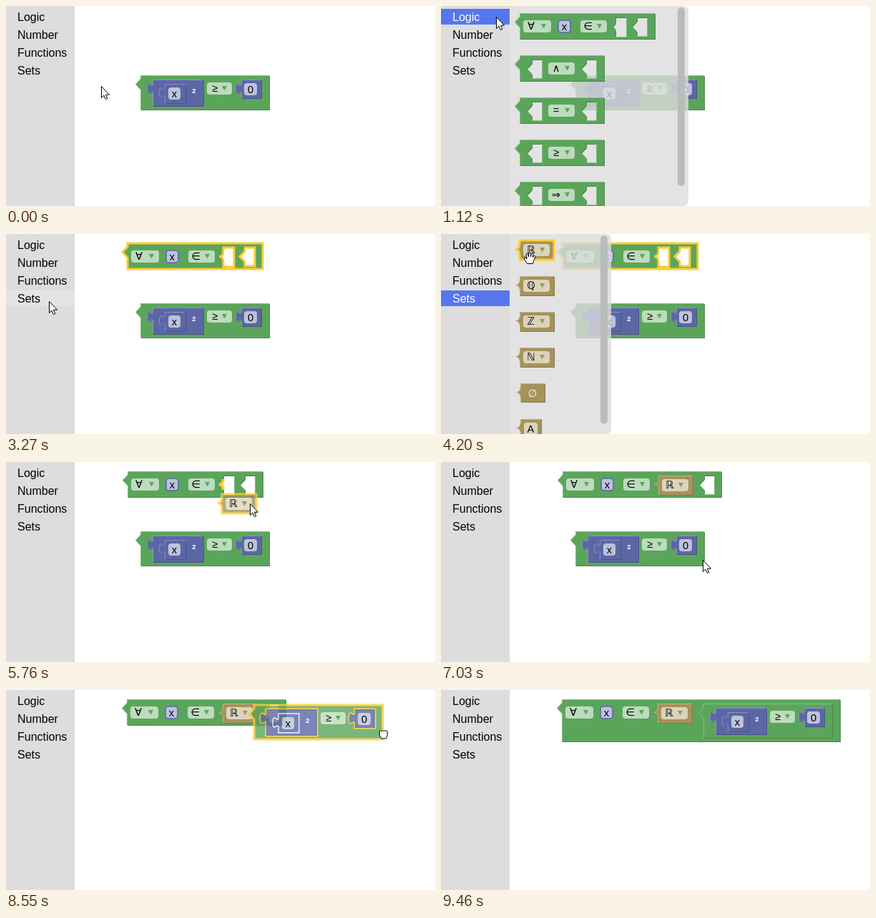
These frames come from a looping animation (600 px wide and 280 px high, 10000 ms). An HTML page:

```html
<!DOCTYPE html>
<html lang="en">
<head>
<meta charset="utf-8">
<title>Block editor</title>
<style>
html, body { margin: 0; width: 100%; height: 100%; overflow: hidden; background: #fff; }
svg { display: block; width: 600px; height: 280px; }
text { font: 14.67px "Liberation Sans", "DejaVu Sans", sans-serif; text-anchor: middle; }
.menu text { font-size: 16px; text-anchor: start; }
.sup { font-size: 9.5px; font-weight: bold; fill: #fff; }
.body, .dark { fill-rule: evenodd; }
.light { fill: none; stroke-width: 1; }
.field { fill: #fff; fill-opacity: .6; }
.var { fill: #bcc1df; stroke: #5b67a5; stroke-width: 1.6; }
.sel > .body { stroke: #fc3; stroke-width: 3; }
.sel > .light, .drag .light, .drag .dark { display: none; }
.drag .body { opacity: .8; }
.drag .inner > .body { stroke: #fff; stroke-width: 1.4; }
.hint { fill: none; stroke: #fc3; stroke-width: 4; }
.cursor path { fill: #fff; stroke: #000; stroke-linejoin: round; }
</style>
</head>
<body>
<svg id="stage" viewBox="0 0 600 280"></svg>
<script>
const GREEN = { fill: '#5ba55b', dark: '#498449', light: '#8cc08c' };
const BLUE = { fill: '#5b67a5', dark: '#495284', light: '#8c95c0' };
const TAN = { fill: '#a5935b', dark: '#847649', light: '#c0b38c' };

// Connector outlines, drawn upwards from y = 20 to y = 5.
const TAB = {
  bool: 'l-7-7.5l7-7.5',
  num: 'c0-10-8 8-8-7.5s8 2.5 8-7.5',
  set: 'c0-5-3-7.5-6-7.5c3 0 6-2.5 6-7.5'
};

const outline = (x, y, w, h, tab) =>
  `M${x} ${y}h${w}v${h}h${-w}V${y + 20}${TAB[tab]}Z`;

const at = (x, y) => `translate(${x} ${y})`;

function block({ x = 0, y = 0, w, h, tab, color, slots = [], inner = '', cls = '', id = '' }) {
  const d = outline(0, 0, w, h, tab) + slots.map(s => outline(...s)).join('');
  const edges = `M.5 ${h - 1}V20${TAB[tab]}V.5H${w - 1}` +
    slots.map(([sx, sy, sw, sh]) => `M${sx} ${sy + sh + .5}h${sw + .5}v${-sh}`).join('');
  return `<g class="${cls}" ${id && `id="${id}"`} transform="${at(x, y)}">
    <path class="dark" d="${d}" fill="${color.dark}" transform="translate(1 1)"/>
    <path class="body" d="${d}" fill="${color.fill}"/>
    <path class="light" d="${edges}" stroke="${color.light}"/>${inner}</g>`;
}

const label = (s, x, y, cls = '') => `<text class="${cls}" x="${x}" y="${y}">${s}</text>`;
const field = (s, x, y, w, cls = 'field') =>
  `<rect class="${cls}" x="${x}" y="${y}" width="${w}" height="17" rx="4"/>` +
  label(s, x + w / 2, y + 13.5);
const dropdown = (s, x, y, w, color) =>
  `<rect class="field" x="${x}" y="${y}" width="${w}" height="17" rx="4"/>` +
  label(s, x + 11, y + 13) +
  `<path d="M${x + w - 14} ${y + 5}h7l-3.5 6.5z" fill="${color.fill}"/>`;

const setBlock = (s, x, y, id) => block({
  x, y, w: 48, h: 27, tab: 'set', color: TAN, id, inner: dropdown(s, 5, 5, 37, TAN)
});

function compare(x, y, id) {
  const variable = block({
    x: 17, y: 6, w: 29, h: 27, tab: 'num', color: BLUE, cls: 'inner', inner: field('x', 5, 5, 17)
  });
  const square = block({
    x: 17, y: 6, w: 71, h: 37, tab: 'num', color: BLUE, slots: [[17, 6, 29, 27, 'num']],
    inner: variable + label('2', 58, 18.5, 'sup')
  });
  const zero = block({
    x: 141, y: 6, w: 28, h: 26, tab: 'num', color: BLUE, inner: field('0', 4, 5, 18)
  });
  return block({
    x, y, w: 180, h: 48, tab: 'bool', color: GREEN, id,
    slots: [[17, 6, 71, 37, 'num'], [141, 6, 28, 26, 'num']],
    inner: square + dropdown('≥', 93, 10, 35, GREEN) + zero
  });
}

// level: 0 = both slots empty, 1 = set filled, 2 = both filled
function forAll(level, id) {
  const setW = level ? 48 : 15, x2 = level ? 198 : 164;
  const [w, h] = [[189, 36], [222, 36], [389, 59]][level];
  const slots = [[134, 6, setW, 27, 'set'],
    level > 1 ? [x2, 6, 180, 48, 'bool'] : [x2, 6, 14, 26, 'bool']];
  return block({
    w, h, tab: 'bool', color: GREEN, slots, id,
    inner: dropdown('∀', 5, 10, 39, GREEN) + field('x', 54, 10, 17, 'var') +
      dropdown('∈', 85, 10, 37, GREEN) +
      (level ? setBlock('ℝ', 134, 6, '') : '') + (level > 1 ? compare(x2, 6, 'nested') : '')
  });
}

const hint = (x, y, tab, id) =>
  `<path class="hint" id="${id}" d="M${x} ${y + 20}${TAB[tab]}"/>`;

const flyout = (id, right, items, bar) =>
  `<g id="${id}"><path d="M96 0H${right - 8}q8 0 8 8V272q0 8-8 8H96z" fill="#ddd" fill-opacity=".8"/>
   ${items}<rect x="${right - 15}" y="2" width="10" height="${bar}" rx="5" fill="#bbb"/></g>`;

const binary = (op, y) => block({
  x: 110, y, w: 118, h: 36, tab: 'bool', color: GREEN,
  slots: [[17, 6, 14, 26, 'bool'], [93, 6, 14, 26, 'bool']], inner: dropdown(op, 40, 10, 37, GREEN)
});
const logicItems = `<g transform="translate(110 10)">${forAll(0, 'pickAll')}</g>` +
  binary('∧', 69) + binary('=', 128) + binary('≥', 187) + binary('⇒', 246);

const setItems = ['ℝ', 'ℚ', 'ℤ', 'ℕ'].map((s, i) =>
  setBlock(s, 110, 9 + 50 * i, i ? '' : 'pickSet')).join('') +
  block({ x: 111, y: 209, w: 34, h: 26, tab: 'set', color: TAN,
    inner: '<text x="17" y="18.5" fill="#fff">∅</text>' }) +
  block({ x: 111, y: 259, w: 29, h: 27, tab: 'set', color: TAN, inner: field('A', 5, 5, 19) });

const names = ['Logic', 'Number', 'Functions', 'Sets'];
const stage = document.getElementById('stage');
stage.innerHTML = `
  <g id="all">${forAll(0, 'all0')}${forAll(1, 'all1')}${forAll(2, 'all2')}
    ${hint(134, 6, 'set', 'hintSet')}${hint(198, 6, 'bool', 'hintBool')}</g>
  ${compare(188, 97, 'cmp')}
  ${setBlock('ℝ', 0, 0, 'real')}
  <g class="menu"><rect width="96" height="280" fill="#ddd"/>
    <rect id="row" width="96" height="22"/>
    ${names.map((s, i) => label(s, 16, 21 + 25 * i)).join('')}</g>
  ${flyout('logic', 346, logicItems, 250)}
  ${flyout('sets', 238, setItems, 264)}
  <g class="cursor" id="cursor">
    <path id="arrow" d="M.5.5V16.5L4 13.2 6.4 18.6 8.8 17.6 6.5 12.2H11.5Z"/>
    <path id="open" d="M-3.5 7.5-7.6 1a1.4 1.4 0 0 1 2.3-1.5L-3.8 1-5-5.3a1.3 1.3 0 0 1 2.5-.6L-1.6-2-1.4-7a1.3 1.3 0 0 1 2.6 0L1.4-2 2.4-6.2a1.3 1.3 0 0 1 2.5.5L4.3-1 5.6-3.2a1.3 1.3 0 0 1 2.3 1L5.5 3.8 4.5 7.5Z"/>
    <path id="fist" d="M-5.5 0V-3a1.4 1.4 0 0 1 2.7-1a1.4 1.4 0 0 1 2.7-.4a1.4 1.4 0 0 1 2.7.3a1.4 1.4 0 0 1 2.7 1V1.5L3.8 6H-3L-5.5 1.5Z"/>
  </g>`;

const el = {};
stage.querySelectorAll('[id]').forEach(n => el[n.id] = n);
const labels = stage.querySelectorAll('.menu text');

// Screen refresh moments of the recorded session.
const TICKS = [0, 130, 270, 420, 550, 700,
  980, 1120, 1260, 1400, 1540, 1680, 1820, 1970, 2120,
  2390, 2530, 2680, 2830, 2980, 3130, 3270, 3390,
  3810, 3950, 4080, 4200, 4360, 4510, 4660, 4800,
  4920, 5060, 5200, 5340, 5480, 5620, 5760, 5910, 6040,
  6340, 6480, 6620, 6750, 6890, 7030,
  7340, 7480, 7610, 7740, 7870, 8000, 8150, 8280,
  8420, 8570, 8720, 8870, 9010, 9160, 9310, 9460];

// Pointer path: time, x, y
const POINTER = [
  [30, 133, 112], [700, 50, 6], [900, 50, 6], [1540, 150, 38], [1820, 153, 41],
  [1970, 185, 42], [2120, 213, 44], [2250, 213, 44], [3200, 60, 94], [3700, 60, 94],
  [4200, 124, 34], [4360, 124, 34], [4660, 147, 23], [4850, 148, 23],
  [5760, 341, 58], [5910, 344, 45], [6040, 345, 42], [6240, 345, 42],
  [6620, 392, 85], [7030, 366, 137], [7250, 369, 138], [8000, 460, 108],
  [8280, 518, 68], [8420, 528, 62], [8600, 528, 62], [9160, 534, 127]
];

function follow(path, t) {
  const i = path.findIndex(p => p[0] > t);
  if (i === 0) return path[0].slice(1);
  if (i < 0) return path[path.length - 1].slice(1);
  const a = path[i - 1], b = path[i];
  const u = (t - a[0]) / (b[0] - a[0]);
  const k = b[0] - a[0] > 300 ? u * u * (3 - 2 * u) : u;
  return [a[1] + (b[1] - a[1]) * k, a[2] + (b[2] - a[2]) * k];
}

const show = (id, on) => el[id].style.display = on ? '' : 'none';
const mark = (id, cls, on) => el[id].classList.toggle(cls, on);
const move = (id, x, y) => el[id].setAttribute('transform', at(Math.round(x), Math.round(y)));

function draw(t) {
  const within = (a, b) => t >= a && t < b;
  const [x, y] = follow(POINTER, t);

  const logicOpen = within(980, 1820), setsOpen = within(3390, 4920);
  const dragAll = within(1820, 2390), dragSet = within(4920, 6340), dragCmp = within(7340, 8570);

  const hover = x < 96 ? Math.floor((y - 4) / 25) : -1;
  const active = logicOpen ? 0 : setsOpen ? 3 : -1;
  const row = active >= 0 ? active : hover;
  show('row', row >= 0 && row < 4);
  el.row.setAttribute('y', 4 + 25 * row);
  el.row.setAttribute('fill', active >= 0 ? '#57e' : '#e4e4e4');
  labels.forEach((n, i) => n.setAttribute('fill', i === active ? '#fff' : '#000'));

  show('logic', logicOpen);
  show('sets', setsOpen);
  mark('pickAll', 'sel', t >= 1540);
  mark('pickSet', 'sel', t >= 4080);

  const level = t < 6340 ? 0 : t < 8570 ? 1 : 2;
  show('all', t >= 1820);
  for (let i = 0; i < 3; i++) show('all' + i, i === level);
  mark('all0', 'sel', t < 4920);
  mark('all', 'drag', dragAll);
  if (dragAll) {
    const k = Math.min(1, (t - 1820) / 300);
    move('all', 110 + 60 * k, 10 + 3 * k);
  } else move('all', t < 7340 ? 170 : 169, 13);
  show('hintSet', within(5620, 6340));
  show('hintBool', within(7870, 8570));

  show('real', dragSet);
  mark('real', 'sel', dragSet);
  mark('real', 'drag', dragSet);
  move('real', x - 39, y - 13.5);

  show('cmp', t < 8570);
  mark('cmp', 'sel', dragCmp);
  mark('cmp', 'drag', dragCmp);
  move('cmp', dragCmp ? x - 181 : 188, dragCmp ? y - 41 : 97);
  mark('nested', 'sel', t < 9310);

  const open = within(1540, 1820) || within(4080, 4920);
  const fist = dragAll || dragCmp;
  show('cursor', t < 9460);
  show('open', open);
  show('fist', fist);
  show('arrow', !open && !fist);
  move('cursor', x, y);
}

const start = performance.now();
let last = -1;
function loop() {
  const now = (performance.now() - start) % 10000;
  const t = TICKS.filter(v => v <= now).pop();
  if (t !== last) draw(last = t);
  requestAnimationFrame(loop);
}
loop();
</script>
</body>
</html>
```
